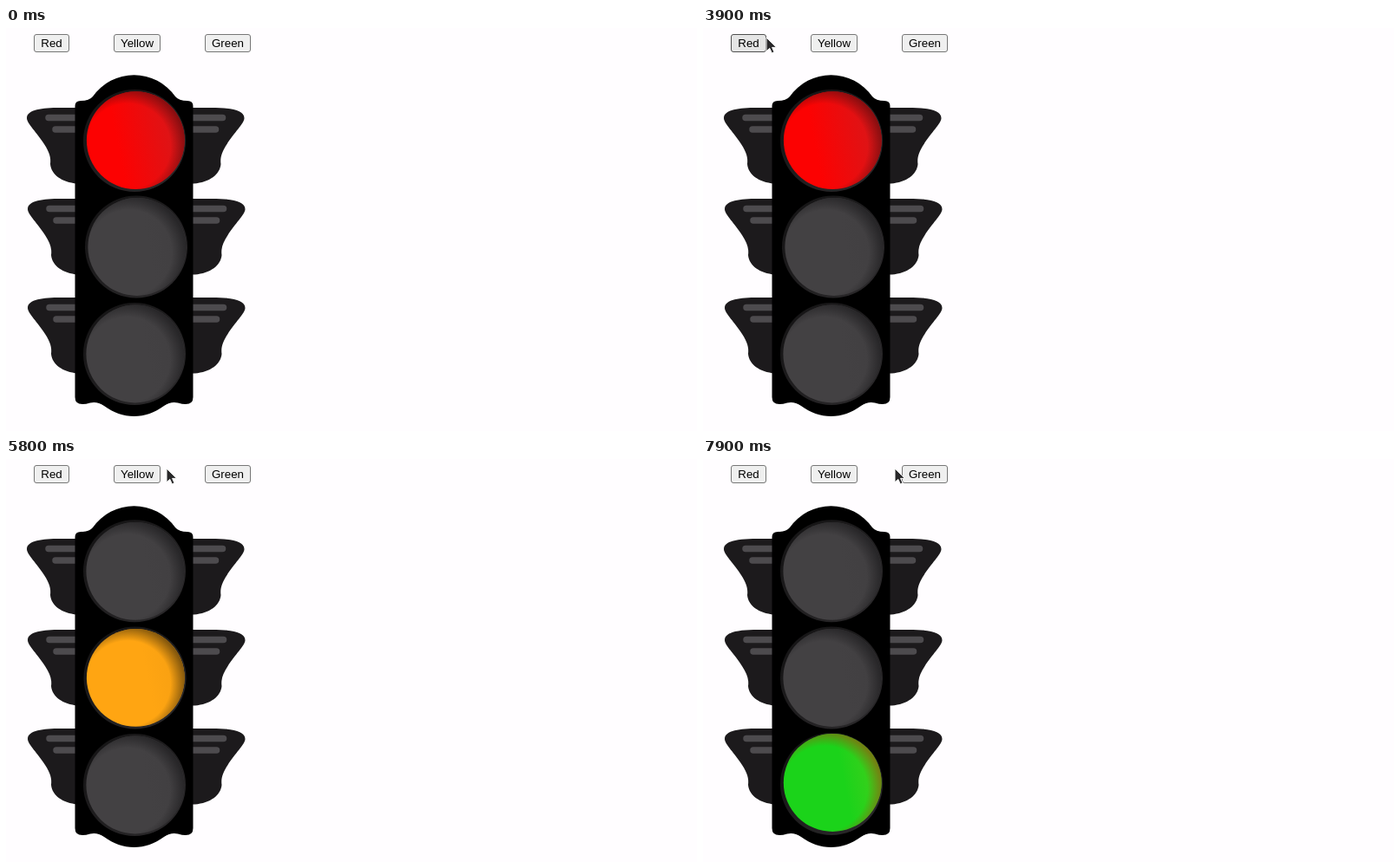
Animation of 796x465 px, one loop 8000 ms. Source, as an HTML page:

```html
<!DOCTYPE html>
<html lang="en">
<head>
<meta charset="utf-8">
<title>Traffic light</title>
<style>
  html, body { margin: 0; width: 100%; height: 100%; overflow: hidden; background: #fffdff; }
  svg { display: block; }
  text { font: 13.333px "Liberation Sans", Arial, sans-serif; text-anchor: middle; }
  .button rect { fill: #efefef; stroke: #767676; }
  .hover rect { fill: #e5e5e5; stroke: #4f4f4f; }
  .pressed rect { fill: #f5f5f5; stroke: #8d8d8d; }
</style>
</head>
<body>
<svg width="796" height="465" viewBox="0 0 796 465">
  <defs>
    <linearGradient id="rim" x1="0" y1="0" x2="1" y2="1">
      <stop offset=".2" stop-color="#171617"/>
      <stop offset="1" stop-color="#2d2b2d"/>
    </linearGradient>
    <g id="wing">
      <path fill="#1c1a1c" d="M100 92H62C42 92 24 94 24 104C24 110 36 121 44 134C50 143 52 150 51 157C52 169 64 178 82 179.500H100Z"/>
      <path stroke="#4d4b4e" stroke-width="7.5" stroke-linecap="round" d="M49 103.500H100M57 117H100"/>
    </g>
    <g id="wings">
      <use href="#wing"/>
      <use href="#wing" transform="matrix(-1 0 0 1 298.5 0)"/>
    </g>
  </defs>
  <use href="#wings"/>
  <use href="#wings" x="1" y="105"/>
  <use href="#wings" x="1" y="219"/>
  <path d="M79.500 90Q79.500 84 86 84Q96 84 100 79A58 58 0 0 1 195 79Q199 84 209 84Q215.500 84 215.500 90V426Q215.500 434 207 434Q203 434 198 432.500Q190 430.500 182 436C171 444 160 448 147.500 448C135 448 124 444 113 436Q105 430.500 97 432.500Q92 434 88 434Q79.500 434 79.500 426Z"/>
  <g id="lamps"></g>
  <g id="buttons"></g>
  <path id="cursor" fill="#29282a" stroke="#fff" d="M1 1V16.800L4.800 13.400 7.300 18.900 10 17.700 7.600 12.400H12.600Z"/>
</svg>
<script>
const LOOP = 8000;
const byId = id => document.getElementById(id);
const svgNS = "http://www.w3.org/2000/svg";

// Left side, right side, shaded rim, and where the right-hand tone begins.
const palettes = {
  off: ["#434143", "#403e40", "#222123", .5],
  red: ["#fc0202", "#d01c1f", "#7a0c0e", .2],
  yellow: ["#ffa512", "#f39d12", "#6e4a0c", .5],
  green: ["#1bd31a", "#4fcd1c", "#7e7010", .5]
};
for (const [name, [left, right, shade, turn]] of Object.entries(palettes)) {
  document.querySelector("defs").insertAdjacentHTML("beforeend",
    `<linearGradient id="${name}" x2="1" y2="-.2">
      <stop offset="${turn}" stop-color="${left}"/>
      <stop offset="1" stop-color="${right}"/>
    </linearGradient>
    <radialGradient id="${name}-shade" cx=".42" cy=".56" r=".59">
      <stop offset=".74" stop-color="${shade}" stop-opacity="0"/>
      <stop offset="1" stop-color="${shade}" stop-opacity=".85"/>
    </radialGradient>`);
}

function lamp(name, x, y, faceX = x + .8, faceY = y) {
  const circle = (cx, cy, r, fill) => `<circle cx="${cx}" cy="${cy}" r="${r}" fill="url(#${fill})"/>`;
  return circle(x, y, 59, "rim")
    + circle(faceX, faceY, 56.4, name)
    + circle(faceX, faceY, 56.4, name + "-shade");
}

// Each scene lists its lamps from top to bottom.
const scenes = [
  [0, lamp("red", 148, 130, 149.3, 129.7) + lamp("off", 150, 252.5) + lamp("off", 148, 376)],
  [4900, lamp("off", 148, 129.3) + lamp("yellow", 148.5, 252.5, 149.3, 252.3) + lamp("off", 148, 376)],
  [6600, lamp("off", 148, 129.3) + lamp("off", 148, 252.5) + lamp("green", 148, 375, 149.2, 373.5)]
];

const buttons = [["Red", 32.5, 40], ["Yellow", 124.5, 53], ["Green", 229.5, 52]].map(([label, x, width]) => {
  const group = document.createElementNS(svgNS, "g");
  group.innerHTML = `<rect x="${x}" y="7.5" width="${width}" height="20" rx="2.5"/>
    <text x="${x + width / 2}" y="22">${label}</text>`;
  byId("buttons").append(group);
  return group;
});

// [time, button index, state]
const buttonStates = [
  [0, -1, ""],
  [1200, 0, "hover"], [2500, 0, "pressed"], [2600, 0, "hover"], [4000, -1, ""],
  [4300, 1, "hover"], [4700, 1, "pressed"], [4900, 1, "hover"], [5800, -1, ""],
  [5900, 2, "hover"], [6400, 2, "pressed"], [6600, 2, "hover"], [7800, -1, ""]
];

// [time, x, y]: the pointer jumps from place to place.
const pointer = [
  [0, -50, 0], [1300, 58, 5], [1500, 60.5, 9],
  [3900, 72, 10], [4000, 84, 10], [4100, 97, 10], [4200, 110, 10],
  [4300, 121, 10], [4400, 130, 10], [4500, 136, 10],
  [5700, 152, 10], [5800, 184, 10], [5900, 207, 10],
  [6100, 227, 10], [6200, 239, 10], [7800, 229, 10], [7900, 220, 10]
];

const at = (steps, time) => steps.findLast(step => step[0] <= time);
let shownScene;

function draw(now) {
  const time = now % LOOP;
  const scene = at(scenes, time);
  if (scene !== shownScene) {
    byId("lamps").innerHTML = scene[1];
    shownScene = scene;
  }
  const [, active, state] = at(buttonStates, time);
  buttons.forEach((button, i) =>
    button.setAttribute("class", i === active ? "button " + state : "button"));
  const [, x, y] = at(pointer, time);
  byId("cursor").setAttribute("transform", `translate(${x} ${y})`);
}

const start = performance.now();
function tick() {
  draw(performance.now() - start);
  requestAnimationFrame(tick);
}
tick();
</script>
</body>
</html>
```
